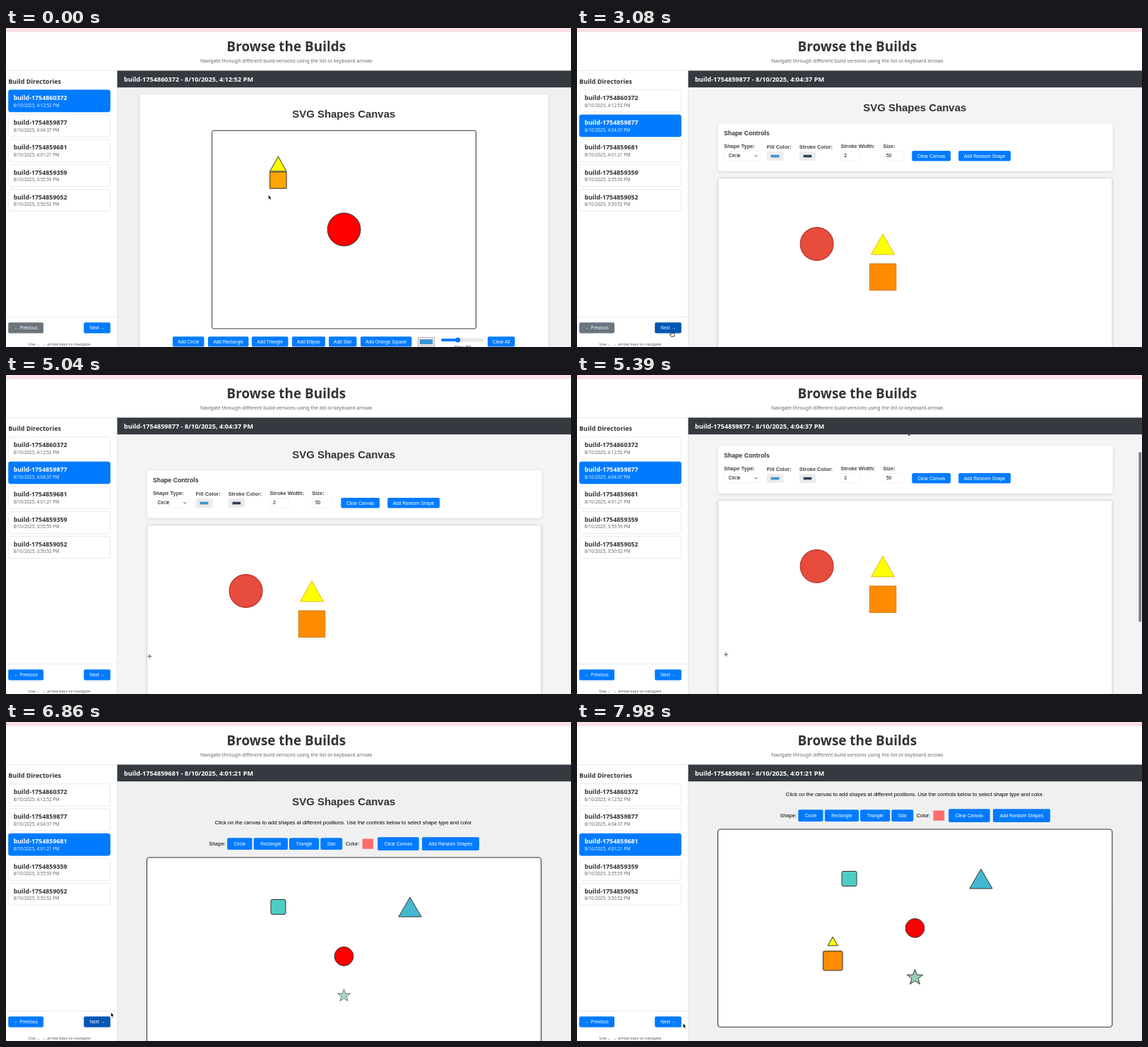
An HTML page that plays this animation: 800 px wide and 452 px high, repeating every 8 s.

```html
<!DOCTYPE html>
<html lang="en">
<head>
<meta charset="utf-8">
<title>Browse the Builds</title>
<style>
  html, body { margin: 0; width: 100%; height: 100%; overflow: hidden; background: #fff; }
  svg { display: block; width: 100vw; height: 100vh; }
  text { white-space: pre; }
  .ui { font-family: "Noto Sans", "Open Sans", sans-serif; }
  .page { font-family: "Liberation Sans", Arial, sans-serif; }
  .bold { font-weight: 700; }
  .shadow { filter: drop-shadow(0 1px 2px rgba(0, 0, 0, .12)); }
</style>
</head>
<body>
<svg id="stage" viewBox="0 0 800 452"></svg>
<script>
const LOOP = 8000;
const BLUE = '#007bff', DARK = '#333';
const stage = document.getElementById('stage');

function el(tag, attrs, parent = stage) {
  const node = document.createElementNS('http://www.w3.org/2000/svg', tag);
  for (const key in attrs) node.setAttribute(key, attrs[key]);
  parent.appendChild(node);
  return node;
}
const group = (parent, attrs = {}) => el('g', attrs, parent);
const box = (parent, x, y, x2, y2, fill, more = {}) =>
  el('rect', { x, y, width: x2 - x, height: y2 - y, fill, ...more }, parent);
const circle = (parent, cx, cy, r, fill, more = {}) => el('circle', { cx, cy, r, fill, ...more }, parent);
const poly = (parent, points, fill, more = {}) => el('polygon', { points, fill, ...more }, parent);
function label(parent, text, x, y, size, fill = DARK, cls = 'page', anchor = 'start') {
  const node = el('text', { x, y, 'font-size': size, fill, class: cls, 'text-anchor': anchor }, parent);
  node.textContent = text;
  return node;
}
function button(parent, text, x, y, x2, y2) {
  box(parent, x, y, x2, y2, BLUE, { rx: 1.9 });
  label(parent, text, (x + x2) / 2, (y + y2) / 2 + 2.3, 6.53, '#fff', 'page', 'middle');
}
const outline = (stroke = DARK, width = 1) => ({ stroke, 'stroke-width': width });

// Embedded pages
const clip = el('clipPath', { id: 'viewport' }, el('defs', {}));
box(clip, 157.5, 84, 800, 452, '#000');
const frame = group(stage, { 'clip-path': 'url(#viewport)' });

function makePage(background, titleY) {
  const root = group(frame);
  box(root, 157, 84, 800, 452, background);
  const body = group(root);
  const title = () => label(body, 'SVG Shapes Canvas', 478.3, titleY, 14.93, DARK, 'page bold', 'middle');
  return { root, body, title };
}

function buildToolbarPage() {
  const page = makePage('#f0f0f0', 127.3), b = page.body;
  box(b, 190, 94, 768, 480, '#fff', { rx: 3.7, class: 'shadow' });
  page.title();
  box(b, 291.7, 145.3, 665.5, 426, '#fff', { rx: 1.9, ...outline() });
  poly(b, '385.4,182 373.7,203 397.1,203', '#ff0', outline());
  box(b, 373.7, 204, 397.1, 227.3, 'orange', outline());
  circle(b, 478.6, 285.5, 23.4, 'red', outline());
  [['Add Circle', 236, 280.5], ['Add Rectangle', 286, 343.5], ['Add Triangle', 348, 399.5],
   ['Add Ellipse', 405, 452], ['Add Star', 457, 496.5], ['Add Orange Square', 502, 574.5],
   ['Clear All', 682, 720.5]].forEach(([text, x, x2]) => button(b, text, x, 437.3, x2, 451.6));
  box(b, 583.5, 438.5, 606.5, 450.8, '#efefef', outline('#888', .6));
  box(b, 586, 441.2, 604, 448, '#3498db', outline('#777', .4));
  box(b, 616.3, 440.5, 676, 443.7, '#efefef', { rx: 1.6, ...outline('#b8b8b8', .5) });
  box(b, 616, 440.3, 640, 443.9, '#0075ff', { rx: 1.7 });
  circle(b, 639.7, 442, 3.6, '#0075ff');
  label(b, 'Size: 50', 646.5, 455.4, 6.53, DARK, 'page', 'middle');
  return page;
}

function buildPanelPage() {
  const page = makePage('#f4f4f4', 118), b = page.body;
  page.title();
  box(b, 199.7, 135.2, 758.7, 202.8, '#fff', { rx: 3.7, class: 'shadow' });
  label(b, 'Shape Controls', 208, 152.3, 8.74, DARK, 'page bold');
  [['Shape Type:', 208, 170.2], ['Fill Color:', 268.8, 171.4], ['Stroke Color:', 314.8, 171.4],
   ['Stroke Width:', 373.5, 170.2], ['Size:', 433.3, 170.2]]
    .forEach(([text, x, y]) => label(b, text, x, y, 7.47, '#444', 'page bold'));
  [[208, 259], [373.5, 400], [433.3, 463]].forEach(([x, x2]) =>
    box(b, x, 174.5, x2, 188, '#fff', { rx: 1.5, ...outline('#e6e6e6', .5) }));
  [['Circle', 214.8], ['2', 378.3], ['50', 438]].forEach(([text, x]) => label(b, text, x, 183.4, 6.53, '#000'));
  el('path', { d: 'M251.4 180.2l2 2 2-2', fill: 'none', ...outline('#222', .8) }, b);
  [[268.8, '#3498db'], [314.8, '#2c3e50']].forEach(([x, fill]) => {
    box(b, x, 175, x + 23.6, 188, '#ececec', { rx: 1.5 });
    box(b, x + 6, 179.9, x + 17.3, 183.2, fill, outline('#777', .3));
  });
  button(b, 'Clear Canvas', 474.3, 174, 529, 188.4);
  button(b, 'Add Random Shape', 540.2, 174, 614, 188.4);
  box(b, 199.9, 212.6, 757.8, 637, '#fff', { rx: 2, class: 'shadow', ...outline('#d5d5d5', .9) });
  circle(b, 339.6, 306, 23.4, '#e74c3c', outline('#b5342a', 1.2));
  poly(b, '433,291.8 416.6,320.9 449.4,320.9', '#ff0', outline('#d6b500', .9));
  box(b, 414.3, 334, 451.8, 371.6, '#ff8c00', outline('#d06f00', .9));
  return page;
}

const starPoints = (cx, cy, outer, inner) => Array.from({ length: 10 }, (_, i) => {
  const a = i * Math.PI / 5 - Math.PI / 2, r = i % 2 ? inner : outer;
  return (cx + r * Math.cos(a)).toFixed(2) + ',' + (cy + r * Math.sin(a)).toFixed(2);
}).join(' ');

function buildPickerPage() {
  const page = makePage('#f0f0f0', 118), b = page.body;
  page.title();
  label(b, 'Click on the canvas to add shapes at different positions. Use the controls below to select shape type and color.',
    478.4, 145.2, 7.47, '#000', 'page', 'middle');
  label(b, 'Shape:', 287.2, 175.2, 7.47, '#000');
  label(b, 'Color:', 480.7, 175.2, 7.47, '#000');
  [['Circle', 313.2, 348.5], ['Rectangle', 350.8, 399], ['Triangle', 401, 443.2], ['Star', 445.3, 476.3]]
    .forEach(([text, x, x2]) => button(b, text, x, 164.3, x2, 181));
  box(b, 504.8, 165.6, 520, 179.8, '#ff6b6b', outline('#dda0a0', .4));
  button(b, 'Clear Canvas', 526.2, 163.3, 584.7, 182);
  button(b, 'Add Random Shapes', 589, 163.3, 670, 182);
  box(b, 199.4, 192, 757.8, 472.3, '#fff', { rx: 3.7, ...outline(DARK, 1.1) });
  const line = outline();
  page.shapes = [
    circle(b, 478.5, 332, 13.4, 'red', line),
    box(b, 375, 251.5, 396, 272.5, '#4ecdc4', { rx: 2, ...line }),
    poly(b, '572,248.3 555.9,276 588.1,276', '#45b7d1', line),
    poly(b, starPoints(478.5, 402, 11.7, 4.8), '#96ceb4', line),
    box(b, 348.4, 364.6, 376, 392, '#ff8c00', { rx: 2, ...line }),
    poly(b, '362.1,344.5 355,356.9 369.3,356.9', '#ff0', line)
  ];
  return page;
}

const pages = [buildToolbarPage(), buildPanelPage(), buildPickerPage()];
const thumb = box(frame, 795.4, 86, 799, 300, '#7d7d7d', { rx: 1.8 });

// Surrounding viewer
box(stage, 0, 0, 800, 4.6, '#ffe0e6');
box(stage, 0, 4.6, 800, 5.4, '#dccdd1');
label(stage, 'Browse the Builds', 396.8, 33, 18.9, DARK, 'ui bold', 'middle');
label(stage, 'Navigate through different build versions using the list or keyboard arrows',
  396.8, 49, 6.96, '#666', 'ui', 'middle');
box(stage, 0, 60, 157.5, 60.6, '#ddd');
box(stage, 157, 60, 157.6, 452, '#ddd');
box(stage, 157.5, 60.4, 800, 84.2, '#343a40');
const heading = label(stage, '', 167, 75.7, 9.13, '#fff', 'ui bold');
label(stage, 'Build Directories', 3.2, 78.6, 9, DARK, 'ui bold');

const builds = [
  ['build-1754860372', '8/10/2025, 4:12:52 PM'],
  ['build-1754859877', '8/10/2025, 4:04:37 PM'],
  ['build-1754859681', '8/10/2025, 4:01:21 PM'],
  ['build-1754859359', '8/10/2025, 3:55:59 PM'],
  ['build-1754859052', '8/10/2025, 3:50:52 PM']
];
const items = builds.map(([name, date], i) => {
  const y = 87.7 + i * 35.2;
  return {
    card: box(stage, 3.4, y, 147.5, y + 31.2, '#fff', { rx: 2.8, 'stroke-width': .6 }),
    name: label(stage, name, 10.7, y + 14.3, 8.87, DARK, 'ui bold'),
    date: label(stage, date, 10.7, y + 23.9, 6.22, '#666', 'ui')
  };
});

box(stage, 0, 409, 157, 409.6, '#ddd');
function navButton(text, x, x2) {
  const node = box(stage, x, 417.2, x2, 432.4, BLUE, { rx: 1.9 });
  label(stage, text, (x + x2) / 2, 427, 6.3, '#fff', 'ui', 'middle');
  return node;
}
const previous = navButton('← Previous', 3.2, 53);
const next = navButton('Next →', 110.2, 147.8);
label(stage, 'Use ← → arrow keys to navigate', 75.5, 449.8, 5.8, '#555', 'ui', 'middle');

const cursor = group(stage);
const pointers = {
  arrow: el('path', { d: 'M0 0V6.4L1.5 5 2.5 7.4 3.6 6.9 2.6 4.6H4.5Z', fill: '#000', ...outline('#fff', .5) }, cursor),
  hand: el('path', {
    d: 'M-.7 .4Q0-.4 .7 .4V3L3.4 3.4Q4.4 3.7 4.2 5L3.6 7.8H-.7L-2.9 4.9Q-2.7 3.8-1.7 4.3L-.7 5.2Z',
    fill: '#fff', ...outline('#111', .8)
  }, cursor),
  cross: el('path', { d: 'M-3 0H3M0-3V3', ...outline('#333', .8) }, cursor)
};

// Timing
const CLICKS = [0, 3070, 6230];
const POINTER = [[0, 371.6, 236.6], [1890, 371.6, 236.6], [1960, 371, 236.6], [2900, 134, 429.4], [3570, 134, 429.4],
  [3780, 136, 421.6], [4800, 136, 421.6], [5100, 211, 396], [5960, 211, 396], [6200, 134, 424],
  [6700, 134, 424], [6860, 148.5, 411.5], [6950, 172, 400], [7740, 172, 400], [7980, 150.2, 427]];
const HOVER = [[2700, 0], [2900, 1], [4830, 1], [5030, 0], [6120, 0], [6320, 1], [6840, 1], [7040, 0]];
const ENABLE = [[3060, 0], [3340, 1]];
const SCROLLS = [[[0, 0]], [[5120, 0], [5800, 100]], [[6960, 0], [7280, 40]]];
const BARS = [[[0, 0]], [[5120, 0], [5190, 1]], [[6960, 0], [7030, 1], [7770, 1], [7980, 0]]];
const THUMBS = [[0, 0], [241, .655], [330, .85]];
const POP_STARTS = [6230, 6380, 6530, 6680, 6880, 7030], POP_TIME = 330;

const clamp = v => Math.min(1, Math.max(0, v));
const smooth = p => p * p * (3 - 2 * p);
function track(steps, t) {
  const i = steps.findIndex(step => step[0] > t);
  if (i < 0) return steps[steps.length - 1].slice(1);
  if (i === 0) return steps[0].slice(1);
  const a = steps[i - 1], b = steps[i], p = smooth((t - a[0]) / (b[0] - a[0]));
  return a.slice(1).map((v, k) => v + (b[k + 1] - v) * p);
}
const mix = (a, b, p) => `rgb(${a.map((v, i) => Math.round(v + (b[i] - v) * p))})`;

function render(t) {
  const active = CLICKS.filter(time => time <= t).length - 1;
  const scroll = track(SCROLLS[active], t)[0];

  pages.forEach((page, i) => page.root.setAttribute('display', i === active ? 'inline' : 'none'));
  pages[active].body.setAttribute('transform', `translate(0 ${-scroll})`);
  heading.textContent = builds[active].join(' - ');
  items.forEach(({ card, name, date }, i) => {
    const on = i === active;
    card.setAttribute('fill', on ? BLUE : '#fff');
    card.setAttribute('stroke', on ? BLUE : '#dcdcdc');
    name.setAttribute('fill', on ? '#fff' : DARK);
    date.setAttribute('fill', on ? '#e3efff' : '#666');
  });

  const [length, ratio] = THUMBS[active];
  thumb.setAttribute('y', 86 + scroll * ratio);
  thumb.setAttribute('height', length);
  thumb.setAttribute('opacity', track(BARS[active], t)[0]);

  // Shapes grow outward from the canvas centre
  pages[2].shapes.forEach((shape, i) => {
    const p = clamp((t - POP_STARTS[i]) / POP_TIME), s = 1 - (1 - p) ** 2;
    shape.setAttribute('transform', `translate(478.5 332) scale(${s}) translate(-478.5 -332)`);
    shape.setAttribute('opacity', s);
  });

  previous.setAttribute('fill', mix([108, 117, 125], [0, 123, 255], track(ENABLE, t)[0]));
  next.setAttribute('fill', mix([0, 123, 255], [0, 86, 179], track(HOVER, t)[0]));

  const [x, y] = track(POINTER, t);
  const overNext = x > 110 && x < 148 && y > 417 && y < 432.4;
  const overCanvas = active === 1 && x > 200 && y > 212 - scroll;
  const shown = overNext ? 'hand' : overCanvas ? 'cross' : 'arrow';
  for (const kind in pointers) pointers[kind].setAttribute('display', kind === shown ? 'inline' : 'none');
  cursor.setAttribute('transform', `translate(${x} ${y})`);
}

const start = performance.now();
function tick() {
  render((performance.now() - start) % LOOP);
  requestAnimationFrame(tick);
}
tick();
</script>
</body>
</html>
```
